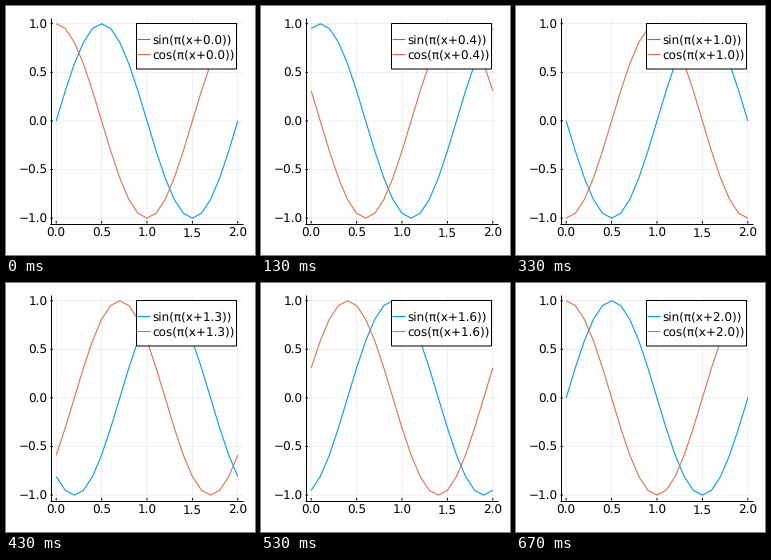
A matplotlib script that plays this animation: 249x249 px, repeating every 710 ms.

```python
import numpy as np
import matplotlib.pyplot as plt
from matplotlib.animation import FuncAnimation
from matplotlib.patches import Rectangle

SIZE = 249
PX = 0.72                      # points per pixel at 100 dpi
LEFT, RIGHT, TOP, BOTTOM = 44.5, 237.0, 11.5, 217.5
PAD = 0.06
DX, DY = 0.25, 0.4             # data area relative to the crisp axis lines
BLUE, ORANGE = "#009afa", "#e36f47"

plt.rcParams.update({
    "font.family": "DejaVu Sans",
    "font.size": 12 * PX,
    "text.hinting": "none",
    "path.simplify": False,
    "toolbar": "None",
})

fig = plt.figure(figsize=(SIZE / 100, SIZE / 100), dpi=100, facecolor="white")
ax = fig.add_axes([0, 0, 1, 1])
ax.set_xlim(0, SIZE)
ax.set_ylim(SIZE, 0)
ax.axis("off")


def to_x(x):
    return LEFT + DX + (x + PAD) / (2 + 2 * PAD) * (RIGHT - LEFT)


def to_y(y):
    return BOTTOM + DY - (y + 1 + PAD) / (2 + 2 * PAD) * (BOTTOM - TOP)


def stroke(xs, ys, color="black", width=1.0, snap=False, **kw):
    return ax.plot(xs, ys, color=color, lw=width * PX, snap=snap,
                   solid_capstyle="butt", **kw)[0]


def label(x, y, text, ha, z=2):
    return ax.text(x, y, text, ha=ha, va="baseline", color="black", zorder=z)


# Grid, ticks and tick labels
for v in np.arange(0, 2.1, 0.5):
    x = to_x(v)
    stroke([x, x], [TOP, BOTTOM], width=0.6, alpha=0.1, zorder=1)
    stroke([x, x], [BOTTOM, BOTTOM - 2.5], zorder=2)
    label(x, 230.5, f"{v:.1f}", "center")
for v in np.arange(-1, 1.1, 0.5):
    y = to_y(v)
    stroke([LEFT, RIGHT], [y, y], width=0.6, alpha=0.1, zorder=1)
    stroke([LEFT, LEFT + 2.5], [y, y], zorder=2)
    label(41.5, y + 4.7, f"{v:.1f}".replace("-", "\u2212"), "right")
stroke([LEFT, LEFT], [TOP, BOTTOM + 0.5], snap=True, zorder=2)
stroke([LEFT - 0.5, RIGHT], [BOTTOM, BOTTOM], snap=True, zorder=2)

# Curves and legend
xs = np.linspace(0, 2, 21)
ax.add_patch(Rectangle((130.5, 17.5), 100, 45.5, fc="white", ec="black",
                       lw=PX, snap=False, zorder=4))
series = []
for name, func, color, y in (("sin", np.sin, BLUE, 33.5),
                             ("cos", np.cos, ORANGE, 48.5)):
    curve = stroke(to_x(xs), to_y(func(np.pi * xs)), color, 1.1, zorder=3,
                   solid_joinstyle="round")
    stroke([131.5, 144.5], [y, y], color, 1.1, zorder=5)
    series.append((name, func, curve, label(145.9, y + 3.8, "", "left", 5)))


def update(n):
    # Ten-millisecond ticks, thirty phase steps per second, the last one held
    shift = min((3 * n + 1) // 10, 20) / 10
    for name, func, curve, text in series:
        curve.set_ydata(to_y(func(np.pi * (xs + shift))))
        text.set_text(f"{name}(π(x+{shift:.1f}))")
    return [item for row in series for item in row[2:]]


anim = FuncAnimation(fig, update, frames=71, interval=10, repeat=True,
                     repeat_delay=0, blit=False)
plt.show()
```
